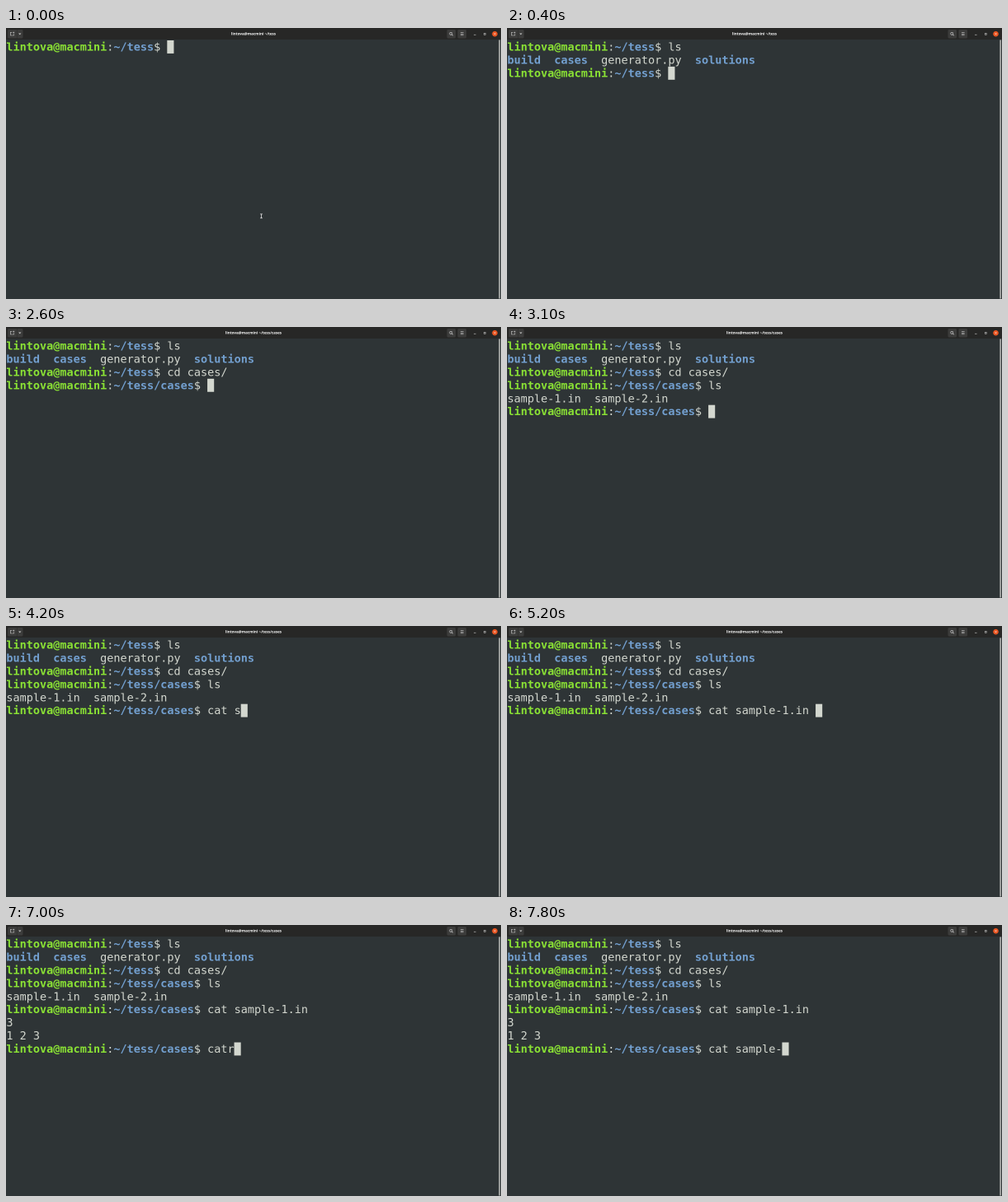
Animation of 600 by 329 pixels, one loop 8 s. Source, as an HTML page with a canvas:

```html
<!DOCTYPE html>
<html lang="en">
<head>
<meta charset="utf-8">
<title>Terminal</title>
<style>
  html, body { margin: 0; height: 100%; overflow: hidden; background: #2e3436; }
  canvas { display: block; width: 600px; height: 329px; }
</style>
</head>
<body>
<canvas id="stage" width="1200" height="658"></canvas>
<script>
const ctx = document.getElementById('stage').getContext('2d', { alpha: false });
ctx.scale(2, 2);                    // supersampled, so text can sit between pixel rows
const LOOP = 8000;
const SCALE = 600 / 1920;           // the terminal grid is laid out for a 1920 px screen
const CELL_W = 26, CELL_H = 51, LEFT = 1, TOP = 48, BASELINE = 40;
const MONO = '43.19px "DejaVu Sans Mono", monospace';
const WHITE = '#d3d7cf', GREEN = '#8ae234', BLUE = '#729fcf';
const BAR = '#272726', BUTTON = '#3c3c3b', ICON = '#d0d0d0';
const USER = 'lintova@macmini';

// Each command: working directory, [time, typed text] steps, time of Enter, output rows.
// An output row is a list of [column, text, is a directory].
const commands = [
  { dir: '~/tess', keys: [[100, 'l'], [200, 'ls']], enter: 400,
    out: [[[0, 'build', true], [7, 'cases', true], [14, 'generator.py'], [28, 'solutions', true]]] },
  { dir: '~/tess', enter: 2600, out: [],
    keys: [[1100, 'c'], [1300, 'cd'], [1400, 'cd '], [1700, 'cd c'], [1800, 'cd ca'],
           [1900, 'cd cas'], [2100, 'cd cases/']] },
  { dir: '~/tess/cases', keys: [[2900, 'l'], [3000, 'ls']], enter: 3100,
    out: [[[0, 'sample-1.in'], [13, 'sample-2.in']]] },
  { dir: '~/tess/cases', enter: 5500, out: [[[0, '3']], [[0, '1 2 3']]],
    keys: [[3700, 'c'], [3800, 'ca'], [3900, 'cat'], [4000, 'cat '], [4200, 'cat s'],
           [4300, 'cat sa'], [4400, 'cat sam'], [4500, 'cat sample-'],
           [4900, 'cat sample-1'], [5200, 'cat sample-1.in ']] },
  { dir: '~/tess/cases', enter: Infinity, out: [],
    keys: [[6200, 'c'], [6300, 'ca'], [6400, 'catr'], [6500, 'catr '], [7000, 'catr'],
           [7200, 'cat'], [7300, 'cat '], [7500, 'cat sa'], [7700, 'cat sam'],
           [7800, 'cat sample-']] }
];

function rect(x, y, w, h, color) {
  ctx.fillStyle = color;
  ctx.fillRect(x, y, w, h);
}

function button(x, w) {
  ctx.fillStyle = BUTTON;
  ctx.beginPath();
  ctx.roundRect(x, 2, w, 10.5, 1.5);
  ctx.fill();
}

function line(color, width, ...points) {
  ctx.strokeStyle = color;
  ctx.lineWidth = width;
  ctx.beginPath();
  points.forEach(([x, y], i) => i ? ctx.lineTo(x, y) : ctx.moveTo(x, y));
  ctx.stroke();
}

function print(row, col, text, color = WHITE, bold = false) {
  ctx.font = (bold ? 'bold ' : '') + MONO;
  ctx.fillStyle = color;
  ctx.fillText(text, LEFT + col * CELL_W, TOP + row * CELL_H + BASELINE);
}

function drawPrompt(row, dir) {
  const dirCol = USER.length + 1;
  print(row, 0, USER, GREEN, true);
  print(row, USER.length, ':');
  print(row, dirCol, dir, BLUE, true);
  print(row, dirCol + dir.length, '$');
  return dirCol + dir.length + 2;
}

function drawTerminal(t) {
  ctx.save();
  ctx.scale(SCALE, SCALE);
  ctx.textAlign = 'left';
  let row = 0;
  for (const { dir, keys, enter, out } of commands) {
    const col = drawPrompt(row, dir);
    const typed = keys.filter(([time]) => time <= t).pop()?.[1] ?? '';
    print(row, col, typed);
    if (t < enter) {
      rect(LEFT + (col + typed.length) * CELL_W, TOP + row * CELL_H, CELL_W, CELL_H, WHITE);
      break;
    }
    row++;
    for (const cells of out) {
      for (const [c, text, isDir] of cells) print(row, c, text, isDir ? BLUE : WHITE, isDir);
      row++;
    }
  }
  ctx.restore();
}

function drawTitleBar(dir) {
  rect(0, 0, 600, 14, BAR);

  button(2, 18.5);
  line(BAR, 0.5, [13.2, 2], [13.2, 12.5]);
  line(ICON, 0.6, [7.2, 5.4], [5.4, 5.4], [5.4, 9], [9.6, 9], [9.6, 7.4]);
  line(ICON, 0.6, [8.2, 5.6], [10.2, 5.6]);
  line(ICON, 0.6, [9.2, 4.6], [9.2, 6.6]);
  ctx.fillStyle = ICON;
  ctx.beginPath();
  ctx.moveTo(15.2, 6.5);
  ctx.lineTo(18.4, 6.5);
  ctx.lineTo(16.8, 8.3);
  ctx.fill();

  ctx.font = 'bold 4.5px "Noto Sans", "Open Sans", sans-serif';
  ctx.textAlign = 'center';
  ctx.fillStyle = '#fff';
  ctx.fillText(`${USER} ${dir}`, 300, 8.7);

  button(534.5, 10.5);
  ctx.strokeStyle = ICON;
  ctx.lineWidth = 0.6;
  ctx.beginPath();
  ctx.arc(539.3, 6.8, 1.5, 0, 7);
  ctx.stroke();
  line(ICON, 0.7, [540.4, 7.9], [541.8, 9.3]);

  button(547.5, 10.5);
  for (const y of [5.6, 7.2, 8.8]) line(ICON, 0.6, [551, y], [554.6, y]);

  line(ICON, 0.6, [567, 8.2], [569.6, 8.2]);
  ctx.strokeRect(579.4, 6.4, 1.8, 1.8);

  ctx.fillStyle = '#e95420';
  ctx.beginPath();
  ctx.arc(592.5, 7.2, 3.3, 0, 7);
  ctx.fill();
  line('#fff', 0.5, [591.4, 6.1], [593.6, 8.3]);
  line('#fff', 0.5, [593.6, 6.1], [591.4, 8.3]);
}

function drawPointer() {
  line('#e8e8e8', 0.8, [309.5, 226], [309.5, 231]);
  line('#e8e8e8', 0.7, [308, 225.9], [311, 225.9]);
  line('#e8e8e8', 0.7, [308, 230.8], [311, 230.8]);
}

function draw(now) {
  const t = now % LOOP;
  rect(0, 0, 600, 329, '#2e3436');
  rect(597.3, 14.5, 1.7, 314, '#a9aba8');
  drawTitleBar(t < 2600 ? '~/tess' : '~/tess/cases');
  drawTerminal(t);
  if (t < 100) drawPointer();
  requestAnimationFrame(draw);
}
requestAnimationFrame(draw);
</script>
</body>
</html>
```
